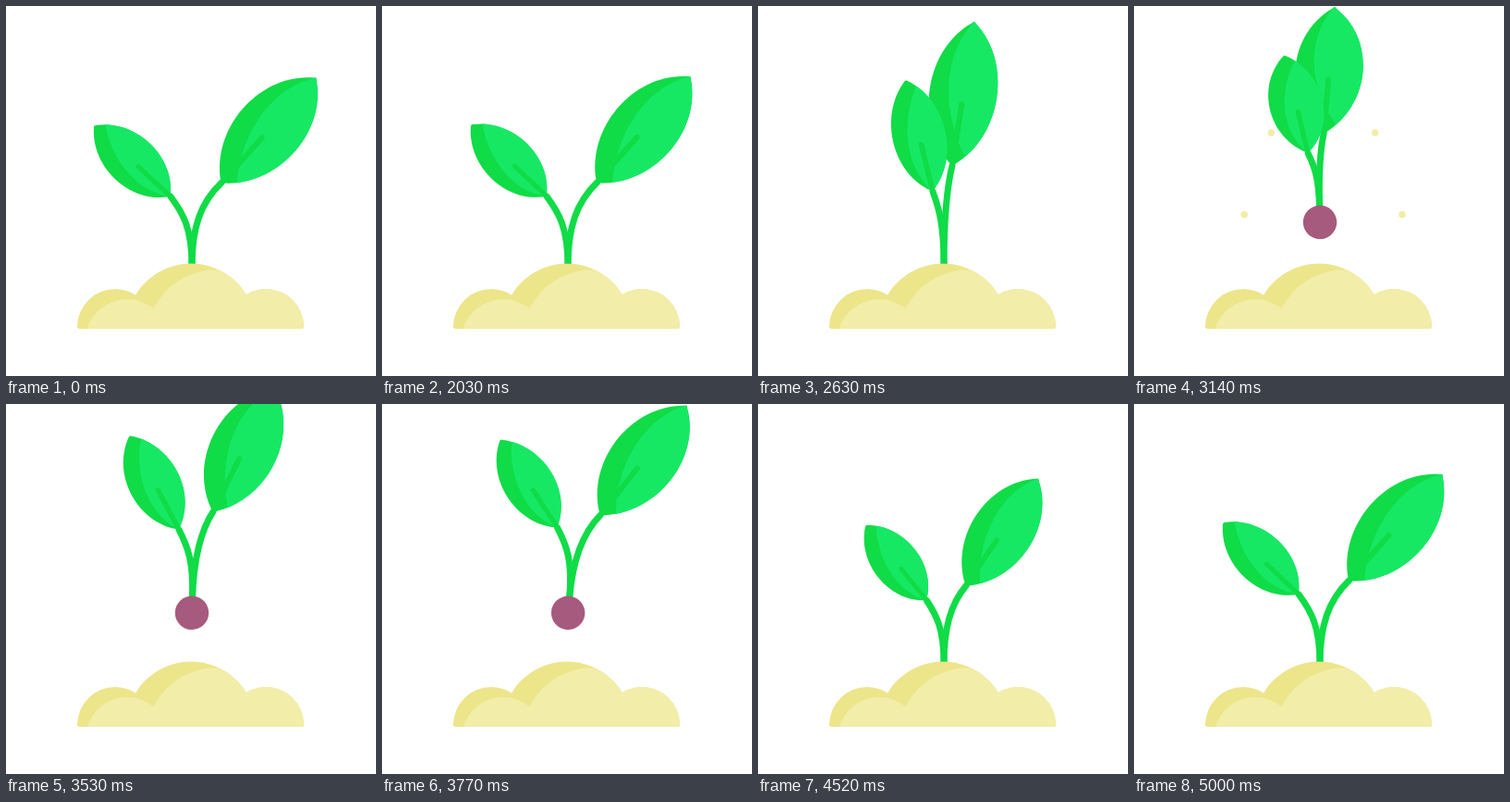
These frames come from a looping animation (400x400 px, 5030 ms). An HTML page with a canvas:

```html
<!DOCTYPE html>
<html lang="en">
<head>
<meta charset="utf-8">
<title>Sprout</title>
<style>
html, body { margin: 0; height: 100%; overflow: hidden; background: #fff; }
canvas { display: block; width: 100vw; height: 100vh; }
</style>
</head>
<body>
<canvas id="stage" width="400" height="400"></canvas>
<script>
const ctx = document.getElementById('stage').getContext('2d');
const LOOP = 5030, GROUND = 278, RAD = Math.PI / 180;
const GREEN = '#17e864', DARK_GREEN = '#0fdc46';
const SAND = '#f2eda8', DARK_SAND = '#ede58a', BULB = '#a65a7e';

const clamp = x => Math.max(0, Math.min(1, x));
const smooth = x => x * x * (3 - 2 * x);
const mix = (a, b, k) => a + (b - a) * k;

// Eased value from a list of [time, value] keys.
function track(t, keys) {
  let [t0, v0] = keys[0];
  for (const [t1, v1] of keys) {
    if (t < t1) return t <= t0 ? v0 : mix(v0, v1, smooth((t - t0) / (t1 - t0)));
    t0 = t1;
    v0 = v1;
  }
  return v0;
}

const leafShape = new Path2D('M2-1C48-38 48-116 2-151Q0-154-2-151C-48-116-48-38-2-1Q0 1 2-1Z');
const leafLight = new Path2D('M14-9C-16-46-32-108 0-153L70-153V-9Z');

const mound = new Path2D();
for (const [x, y, r] of [[118, 347, 41], [200, 348.2, 69.8], [281, 347, 41]]) {
  mound.moveTo(x - r, y);
  mound.arc(x, y, r, Math.PI, 0);
  mound.closePath();
}
mound.roundRect(77, 345, 245, 4, [0, 0, 3, 3]);

const moundLight = new Path2D();
for (const [x, r] of [[131, 45], [228, 77]]) {
  moundLight.moveTo(x + r, 362);
  moundLight.arc(x, 362, r, 0, 2 * Math.PI);
}
moundLight.rect(228, 270, 100, 90);

function dot(x, y, r, color) {
  ctx.fillStyle = color;
  ctx.beginPath();
  ctx.arc(x, y, r, 0, 2 * Math.PI);
  ctx.fill();
}

function clipped(shape, base, light, lightColor) {
  ctx.fillStyle = base;
  ctx.fill(shape);
  ctx.save();
  ctx.clip(shape);
  ctx.fillStyle = lightColor;
  ctx.fill(light);
  ctx.restore();
}

function leaf([x, y], angle, size, stretch, flip) {
  ctx.save();
  ctx.translate(x, y);
  ctx.scale(size, size * stretch);
  ctx.rotate(angle * RAD);
  if (flip) {
    ctx.translate(0, -153);
    ctx.scale(1, -1);
  }
  clipped(leafShape, DARK_GREEN, leafLight, GREEN);
  ctx.strokeStyle = DARK_GREEN;
  ctx.lineWidth = flip ? 7 : 6;
  ctx.beginPath();
  ctx.moveTo(0, flip ? -149 : -4);
  ctx.lineTo(0, flip ? -88 : -65);
  ctx.stroke();
  ctx.restore();
}

// fold: 0 = leaves spread, 1 = leaves gathered upright
function plant({ x = 201, y = GROUND, size = 1, fold = 0, stem = 1, stretch = 1, lean = 0, bulb = false }) {
  const left = [mix(-23, -12, fold) * size, mix(-72, -71, fold) * size * stem];
  const right = [mix(32, 9, fold) * size, mix(-87, -97, fold) * size * stem];
  ctx.save();
  ctx.translate(x, y + 18);
  ctx.rotate(lean * RAD);
  ctx.translate(0, -18);
  ctx.lineCap = 'round';
  ctx.strokeStyle = DARK_GREEN;
  ctx.lineWidth = 7;
  for (const [[ex, ey], bend] of [[left, .42], [right, .28]]) {
    ctx.beginPath();
    ctx.moveTo(0, 3);
    ctx.bezierCurveTo(0, -38 * size * stem, ex * bend, ey * .75, ex, ey);
    ctx.stroke();
  }
  leaf(right, 42 - 33 * fold, size, stretch, false);
  leaf(left, -47.2 + 33 * fold, size * .735 * (1 + .07 * fold), stretch, true);
  if (bulb) dot(0, 18.8, 18.2, BULB);
  ctx.restore();
}

function pulledPlant(t) {
  plant({
    x: 201 + 330 * clamp((t - 3740) / 340) ** 3,
    y: track(t, [[2630, GROUND], [3140, 215], [3400, 207]]),
    fold: track(t, [[2030, .02], [2630, 1], [3140, 1.1], [3770, .29], [4080, .1]]),
    stem: track(t, [[2030, 1], [2630, 1.09], [3140, .79], [3600, 1]]),
    stretch: track(t, [[2030, 1], [2630, 1.03], [3140, .895], [3600, .98]]),
    lean: track(t, [[2630, 0], [3140, -1.5], [4080, 7.5]]),
    bulb: true
  });
}

function newSprout(t) {
  const left = 1 - clamp((t - 3880) / 1150);
  plant({ size: 1 - left ** 3, fold: .02 + .98 * left ** 1.8 });
}

// Crumbs thrown up from behind the mound.
function crumbs(t) {
  const age = t - 2630;
  for (const [speed, lift, life] of [[.167, .554, 690], [.11, .727, 860]]) {
    if (age < 0 || age > life) continue;
    const y = 290 - lift * age + .000837 * age * age;
    for (const side of [-1, 1]) dot(204.5 + side * speed * age, y, 3.8, SAND);
  }
}

function draw(now) {
  const t = now % LOOP;
  ctx.fillStyle = '#fff';
  ctx.fillRect(0, 0, 400, 400);
  crumbs(t);
  if (t < 2030) plant({});
  else if (t < 4080) pulledPlant(t);
  if (t > 3880) newSprout(t);
  clipped(mound, DARK_SAND, moundLight, SAND);
}

const start = performance.now();
function tick() {
  draw(performance.now() - start);
  requestAnimationFrame(tick);
}
tick();
</script>
</body>
</html>
```
